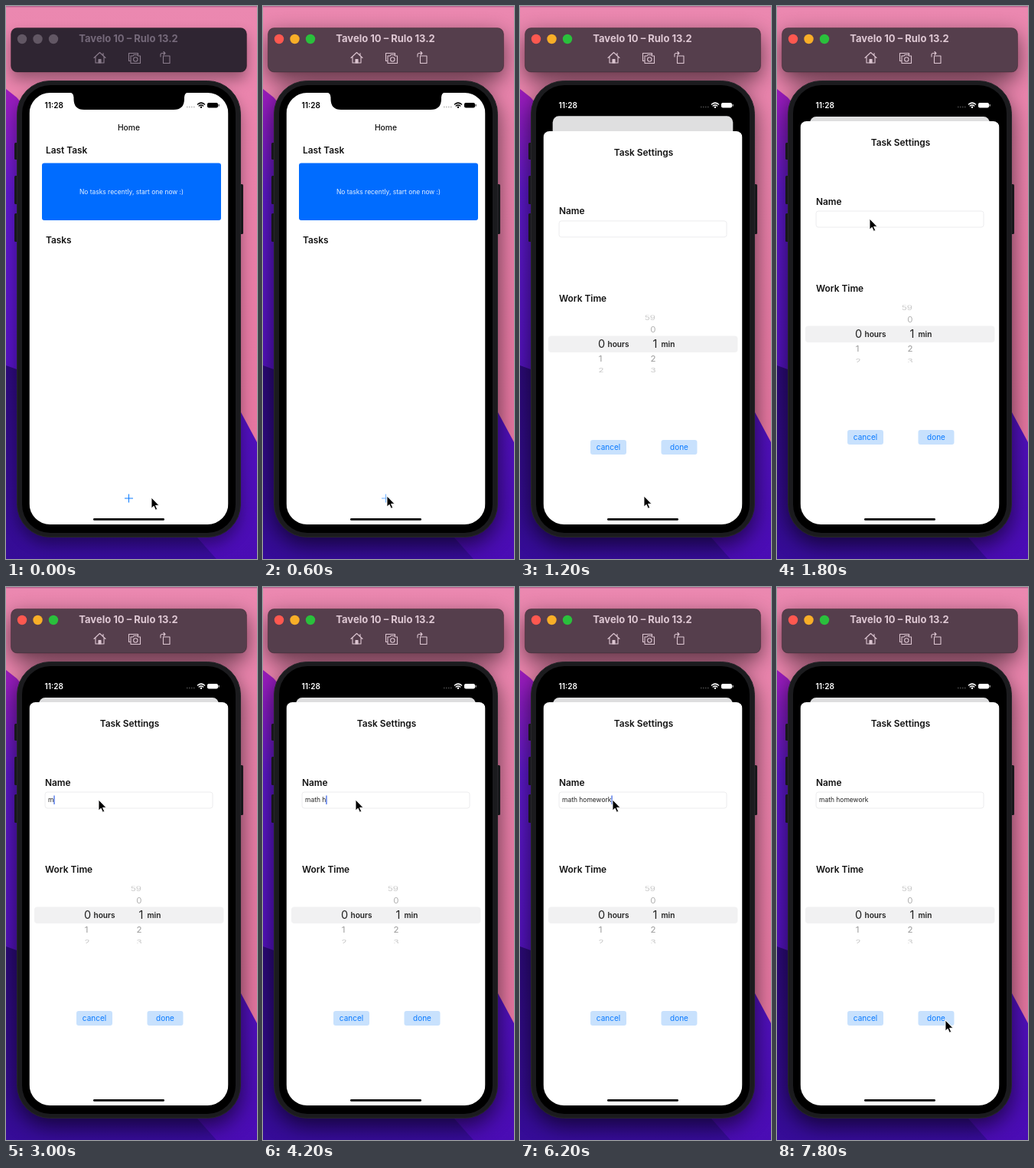
An HTML page that plays this animation: 328 px wide and 720 px high, repeating every 8 s.

```html
<!DOCTYPE html>
<html lang="en">
<head>
<meta charset="utf-8">
<title>Task app demo</title>
<style>
  html, body { margin: 0; width: 100%; height: 100%; overflow: hidden; background: #000; }
  svg { display: block; width: 100%; height: 100%; font-family: Inter, "Open Sans", sans-serif; }
  .heading { font-size: 11.9px; font-weight: 600; fill: #111; }
  .mid { text-anchor: middle; }
  .unit { font-size: 10.1px; font-weight: 600; fill: #222; }
  .picked { font-size: 14.5px; fill: #222; }
  .row { font-size: 11.5px; }
  .button rect { fill: #c8e1fd; }
  .button text { font-size: 10px; fill: #0a7aff; text-anchor: middle; }
  .line { fill: none; stroke: currentColor; stroke-linejoin: round; stroke-linecap: round; }
</style>
</head>
<body>
<svg viewBox="0 0 328 720">
  <defs>
    <linearGradient id="pink" x2="0" y2="1">
      <stop stop-color="#eb88b0"/><stop offset="1" stop-color="#e4719c"/>
    </linearGradient>
    <linearGradient id="purple" x2="0" y2="1">
      <stop stop-color="#9c1cba"/><stop offset=".22" stop-color="#5c18c8"/><stop offset="1" stop-color="#4a0cb4"/>
    </linearGradient>
    <linearGradient id="navy" x2="0" y2="1">
      <stop stop-color="#2c0a78"/><stop offset="1" stop-color="#360c98"/>
    </linearGradient>
    <filter id="blur" x="-30%" y="-30%" width="160%" height="160%"><feGaussianBlur id="softness"/></filter>
    <clipPath id="screen"><rect x="30.5" y="113" width="260" height="562" rx="27"/></clipPath>
    <clipPath id="wheel"><rect x="40" y="389.5" width="242" height="74.5"/></clipPath>
  </defs>

  <!-- Desktop -->
  <rect width="328" height="720" fill="url(#pink)"/>
  <path d="M0 108L14 119Q190 320 307 529L328 568V720H0Z" fill="url(#purple)"/>
  <path d="M0 468L14 473Q160 560 250 692L275 720H0Z" fill="url(#navy)"/>
  <rect width="328" height="1.5" fill="#5a2050" opacity=".35"/>
  <g id="shadow" filter="url(#blur)">
    <rect x="7" y="38" width="307" height="58" rx="8"/>
    <rect x="14" y="108" width="293" height="594" rx="44"/>
  </g>

  <!-- Window bar -->
  <rect id="bar" x="6.5" y="28.5" width="308" height="57.5" rx="8" stroke="#000" stroke-opacity=".25"/>
  <g id="lights"><circle cx="21" cy="43" r="6.2"/><circle cx="41.5" cy="43" r="6.2"/><circle cx="62" cy="43" r="6.2"/></g>
  <text id="device" x="160" y="47.3" class="mid" font-size="13" font-weight="700">Tavelo 10 – Rulo 13.2</text>
  <g id="icons" class="line" stroke-width="1.1">
    <path d="M115 67.5L122.5 60.5L130 67.5M117 66V74H128V66M127 64.5V61.5"/>
    <path d="M121 74V69.500H124V74Z" fill="currentColor"/>
    <path d="M162 71.5H160.5V61.5H172.5V63.5M163 65H166L167 63.5H171.5L172.5 65H175.5V74.5H163Z"/>
    <circle cx="169.3" cy="69.5" r="2.7"/>
    <path d="M205.5 65H214V74.5H205.5ZM202 66V63.5Q202 61.5 204 61.5H208M206 59.5L208 61.5L206 63.5"/>
  </g>

  <!-- Phone body -->
  <g fill="#17171a">
    <rect x="11" y="178" width="5" height="22" rx="1.5"/>
    <rect x="11" y="221" width="5" height="37" rx="1.5"/>
    <rect x="11" y="270" width="5" height="37" rx="1.5"/>
    <rect x="305" y="232" width="5" height="65" rx="1.5"/>
    <rect x="14.5" y="97.5" width="292" height="594" rx="43" fill="#1b1b1e" stroke="#26262a"/>
  </g>
  <rect x="21" y="103" width="279" height="583" rx="37"/>

  <g clip-path="url(#screen)">
    <g id="home">
      <rect id="homeCard" x="-130" width="260" height="580"/>
      <text x="0" y="48.5" class="mid" font-size="10.3" font-weight="500" fill="#111">Home</text>
      <text x="-108.5" y="79" class="heading">Last Task</text>
      <rect id="taskCard" x="-113.5" y="91.5" width="234" height="74.5" rx="3"/>
      <text x="3.5" y="131.7" class="mid" font-size="8.44" fill="#e4f0ff">No tasks recently, start one now :)</text>
      <text x="-108.5" y="196" class="heading">Tasks</text>
      <path id="plus" d="M-5.5 528H5.5M0 522.5V533.5" stroke="#0a7aff"/>
    </g>

    <g id="status">
      <text x="50.5" y="132.8" font-size="10" font-weight="600" fill="currentColor">11:28</text>
      <path d="M236 131.5H247" stroke="currentColor" stroke-width="1.4" stroke-dasharray="1.5 1.5" opacity=".3"/>
      <path class="line" d="M250.5 128Q255 124.2 259.5 128M252.3 130Q255 127.8 257.7 130" stroke-width="1.5"/>
      <circle cx="255" cy="131.7" r="1.2" fill="currentColor"/>
      <rect x="263" y="126" width="14" height="6.6" rx="2" fill="currentColor"/>
      <rect x="277.6" y="128" width="1" height="2.6" fill="currentColor"/>
    </g>

    <g id="sheet">
      <rect x="30.5" y="150" width="260" height="560" rx="8" fill="#fff"/>
      <text x="161.5" y="182" class="heading mid">Task Settings</text>
      <text x="51" y="258.5" class="heading">Name</text>
      <rect x="51" y="267" width="219" height="21" rx="3" fill="#fff" stroke="#ececee"/>
      <text id="typed" x="55" y="280.3" font-size="8.47" fill="#222"></text>
      <rect id="caret" y="271.5" width="1.2" height="11.5" fill="#3560e6"/>
      <text x="51" y="372" class="heading">Work Time</text>
      <rect x="37" y="416.5" width="247.5" height="21.5" rx="4" fill="#f1f1f2"/>
      <g id="rows" class="mid" clip-path="url(#wheel)"></g>
      <text x="114.5" y="431.2" class="unit">hours</text>
      <text x="184.5" y="431.2" class="unit">min</text>
      <g class="button"><rect x="92" y="552" width="47" height="19" rx="3"/><text x="115.5" y="565">cancel</text></g>
      <g class="button"><rect x="184.5" y="552" width="47" height="19" rx="3"/><text x="208" y="565">done</text></g>
    </g>
    <rect x="114" y="667" width="93" height="2.8" rx="1.4"/>
  </g>
  <path d="M82 112H239Q233 113 233 119V121Q233 135 219 135H102Q88.5 135 88.5 121V119Q88.5 113 82 112Z"/>

  <path id="cursor" d="M0 0V14L3.2 11.2L5.4 16.2L7.7 15.2L5.5 10.3H10Z" stroke="#fff" stroke-width=".9"/>
</svg>
<script>
const LOOP = 8000;
const ACTIVATE = 300, OPEN = 750, FOCUS = 2200, TYPE = 2850, CHAR_MS = 250, BLUR = 6900;
const NAME = "math homework";
// time, x, y
const PATH = [[0, 190, 640], [200, 190, 640], [550, 162, 638], [1250, 162, 638],
  [1750, 121, 277], [6300, 121, 277], [7400, 220, 564], [LOOP, 220, 564]];

const $ = id => document.getElementById(id);
const set = (id, attrs) => { for (const k in attrs) $(id).setAttribute(k, attrs[k]); };
const clamp = v => Math.max(0, Math.min(1, v));
const mix = (a, b, p) => a + (b - a) * p;
const mixColor = (a, b, p) => `rgb(${a.map((v, i) => Math.round(mix(v, b[i], p)))})`;

function addRow(x, y, label, cls, color, squash = 1) {
  $("rows").insertAdjacentHTML("beforeend",
    `<text class="${cls}" fill="${color}" transform="translate(${x} ${y}) scale(1 ${squash})">${label}</text>`);
}
addRow(106.5, 432.3, 0, "picked", "#222");
addRow(176.5, 432.3, 1, "picked", "#222");
addRow(105, 450, 1, "row", "#999", .92);
addRow(174, 450, 2, "row", "#999", .92);
addRow(106, 464.5, 2, "row", "#c4c4c4", .65);
addRow(174, 464.5, 3, "row", "#c4c4c4", .65);
addRow(174, 412, 0, "row", "#b0b0b0", .92);
addRow(170, 396, 59, "row", "#c8c8c8", .72);

function cursorAt(t) {
  const i = PATH.findIndex(p => p[0] > t);
  const [t0, x0, y0] = PATH[i - 1], [t1, x1, y1] = PATH[i];
  const u = (t - t0) / (t1 - t0), p = u * u * (3 - 2 * u);
  return [mix(x0, x1, p), mix(y0, y1, p)];
}

// Critically damped spring from 0 to 1
function spring(ms) {
  const s = Math.max(0, ms) * .0124;
  return 1 - (1 + s) * Math.exp(-s);
}

function drawWindow(active) {
  set("bar", { fill: active ? "#553e4c" : "#2f2532" });
  set("device", { fill: active ? "#dfc8d4" : "#75697a" });
  set("icons", { color: active ? "#dcc5d1" : "#8a7c8c" });
  set("shadow", { opacity: active ? .6 : .35 });
  set("softness", { stdDeviation: active ? 14 : 9 });
  const colors = active ? ["#fe5850", "#f8ae28", "#2ac03c"] : Array(3).fill("#625764");
  [...$("lights").children].forEach((c, i) => c.setAttribute("fill", colors[i]));
}

function drawScreens(t) {
  const p = spring(t - OPEN);
  set("sheet", { transform: `translate(0 ${525 * (1 - p)})` });
  set("home", { transform: `translate(160.5 ${113 + 31 * p}) scale(${1 - .096 * p})` });
  set("homeCard", { fill: mixColor([255, 255, 255], [222, 222, 223], p), rx: p ? 9 : 0 });
  set("taskCard", { fill: mixColor([0, 108, 255], [208, 208, 209], clamp(p * 1.25)) });
  set("plus", { opacity: t > 580 && t < OPEN + 50 ? .6 : 1 });
  set("status", { color: mixColor([0, 0, 0], [255, 255, 255], clamp((t - 900) / 300)) });
}

function drawField(t) {
  const typed = NAME.slice(0, Math.max(0, Math.floor((t - TYPE) / CHAR_MS) + 1));
  if ($("typed").textContent !== typed) $("typed").textContent = typed;
  set("caret", {
    x: 55 + (typed ? $("typed").getComputedTextLength() : 0),
    opacity: t > FOCUS && t < BLUR ? 1 : 0
  });
}

function draw(now) {
  const t = now % LOOP;
  drawWindow(t >= ACTIVATE);
  drawScreens(t);
  drawField(t);
  set("cursor", { transform: `translate(${cursorAt(t)})` });
}

const start = performance.now();
function tick() {
  draw(performance.now() - start);
  requestAnimationFrame(tick);
}
tick();
</script>
</body>
</html>
```
